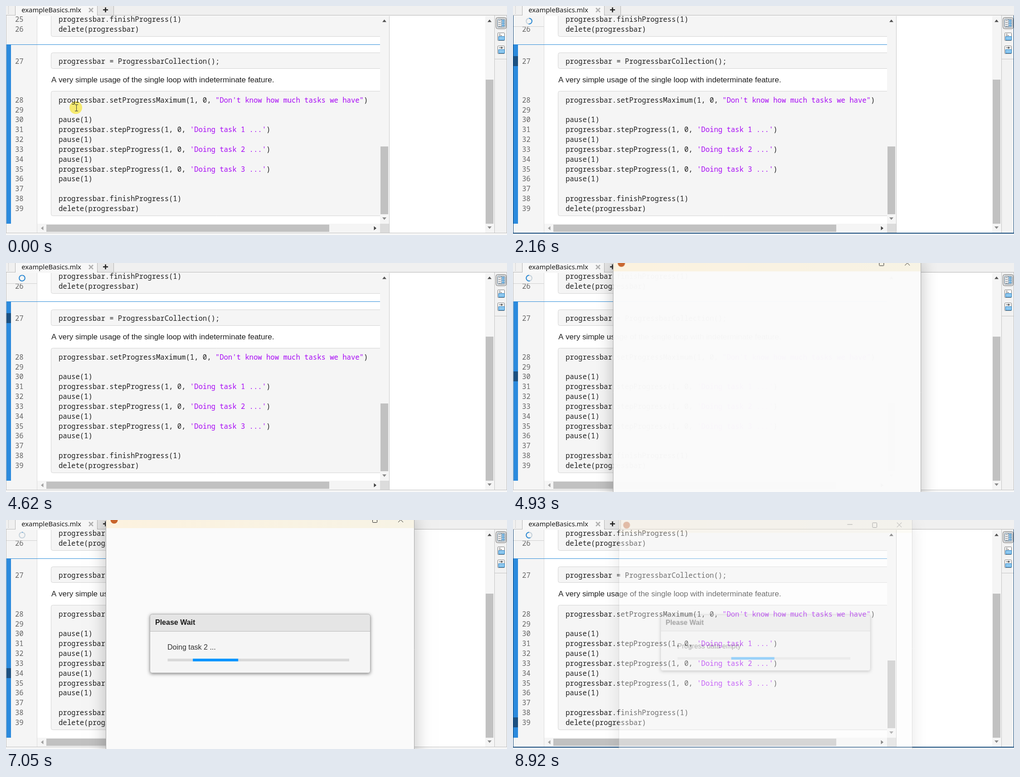
Write an HTML page with a canvas that moves like this. It is 1105 px wide and 507 px high and loops after 8980 ms.

```html
<!DOCTYPE html>
<html lang="en">
<head>
<meta charset="utf-8">
<title>Progress bar demo</title>
<style>
html, body { margin: 0; width: 100%; height: 100%; overflow: hidden; background: #f5f5f5; }
canvas { display: block; }
</style>
</head>
<body>
<canvas id="stage" width="1105" height="507"></canvas>
<script>
const LOOP = 8980, PITCH = 21.82, PAD = 60;
const MONO = '15.58px "Noto Sans Mono", monospace';
const SANS = '"Liberation Sans", Arial, sans-serif';
const stage = document.getElementById('stage').getContext('2d');
const dialogLayer = Object.assign(document.createElement('canvas'), { width: 1105, height: 700 });
const dialogCtx = dialogLayer.getContext('2d');
let c = stage;

const CODE = {
  25: 'progressbar.finishProgress(1)',
  26: 'delete(progressbar)',
  27: 'progressbar = ProgressbarCollection();',
  28: 'progressbar.setProgressMaximum(1, 0, "Don\'t know how much tasks we have")',
  30: 'pause(1)',
  31: "progressbar.stepProgress(1, 0, 'Doing task 1 ...')",
  32: 'pause(1)',
  33: "progressbar.stepProgress(1, 0, 'Doing task 2 ...')",
  34: 'pause(1)',
  35: "progressbar.stepProgress(1, 0, 'Doing task 3 ...')",
  36: 'pause(1)',
  38: 'progressbar.finishProgress(1)',
  39: 'delete(progressbar)'
};

// [start time, value]
const MARKS = [[0, 0], [1140, 27], [4900, 30], [5830, 32], [6860, 34], [7890, 36], [8780, 39]];
const MESSAGES = [[0, "Don't know how much tasks we have"], [5650, 'Doing task 1 ...'],
  [6680, 'Doing task 2 ...'], [7700, 'Doing task 3 ...'], [8720, 'Progress data empty']];

const at = (steps, t) => steps.filter(s => s[0] <= t).pop()[1];
const clamp = v => Math.max(0, Math.min(1, v));
const baseline = n => Math.round(n < 27 ? 35 + (n - 25) * PITCH : n === 27 ? 128 : 213.8 + (n - 28) * PITCH);

function rect(x, y, w, h, color) {
  c.fillStyle = color;
  c.fillRect(x, y, w, h);
}

function box(x, y, w, h, r, fill, stroke) {
  c.beginPath();
  c.roundRect(x, y, w, h, r);
  if (fill) { c.fillStyle = fill; c.fill(); }
  if (stroke) { c.strokeStyle = stroke; c.lineWidth = 1; c.stroke(); }
}

function line(color, width, ...p) {
  c.strokeStyle = color;
  c.lineWidth = width;
  c.beginPath();
  for (let i = 0; i < p.length; i += 4) {
    c.moveTo(p[i], p[i + 1]);
    c.lineTo(p[i + 2], p[i + 3]);
  }
  c.stroke();
}

function arc(x, y, r, from, to, color, width) {
  c.strokeStyle = color;
  c.lineWidth = width;
  c.beginPath();
  c.arc(x, y, r, from, to);
  c.stroke();
}

function disc(x, y, r, color) {
  c.fillStyle = color;
  c.beginPath();
  c.arc(x, y, r, 0, 7);
  c.fill();
}

function text(s, x, y, font, color) {
  c.font = font;
  c.fillStyle = color;
  c.fillText(s, x, y);
}

// Arrow head pointing along (dx, dy)
function arrow(x, y, dx, dy, color) {
  c.fillStyle = color;
  c.beginPath();
  c.moveTo(x + dx * 3, y + dy * 3);
  c.lineTo(x - dx * 2.5 + dy * 4.5, y - dy * 2.5 + dx * 4.5);
  c.lineTo(x - dx * 2.5 - dy * 4.5, y - dy * 2.5 - dx * 4.5);
  c.fill();
}

function codeLine(n) {
  const s = CODE[n], y = baseline(n);
  const cut = s.search(/["']/);
  const parts = cut < 0 ? [s] : [s.slice(0, cut), s.slice(cut, -1), ')'];
  let x = 116;
  parts.forEach((p, i) => {
    text(p, x, y, MONO, i === 1 ? '#a709f5' : '#1f1f1f');
    x += c.measureText(p).width;
  });
}

function tabs() {
  rect(0, 0, 1105, 21, '#f0f0f0');
  for (let y = 1; y < 18; y += 3) rect(5, y, 1, 1, '#999');
  rect(20, 0, 181, 22, '#f7f7f7');
  box(201.5, -4, 36, 24.5, 2, '#e7e7e7', '#b4b4b4');
  line('#b4b4b4', 1, 0, 20.5, 20, 20.5, 20.5, 0, 20.5, 21, 201.5, 0, 201.5, 21, 201, 20.5, 1105, 20.5);
  text('exampleBasics.mlx', 34.2, 14, '14.8px "Noto Sans", sans-serif', '#1a1a1a');
  line('#b0b0b0', 2.5, 183, 4.5, 192, 13.5, 192, 4.5, 183, 13.5);
  line('#222', 2.5, 214, 8.5, 225, 8.5, 219.5, 3, 219.5, 14);
}

function sideIcons() {
  rect(1077, 21, 28, 482, '#f2f2f2');
  line('#c4c4c4', 1, 1077.5, 21, 1077.5, 502, 1078, 117.5, 1105, 117.5);
  box(1080.5, 25.5, 23, 25, 4, '#dcdcdc', '#777');
  box(1084.5, 29.5, 16, 17, 1, '#fff', '#4a6a84');
  line('#4a6a84', 1, 1092.5, 30, 1092.5, 46);
  for (let y = 32.5; y < 46; y += 4) line('#555', 1, 1086, y, 1091, y);
  for (const y of [31.5, 36.5, 41.5]) box(1094.5, y, 4, 3, 0, '#8cc8f0', '#2a7cba');
  for (const y of [68, 97]) {
    box(1084.5, y - 8.5, 15, 17, 1, '#fff', '#777');
    box(1086.5, y - .5, 13, 8, 0, '#8cc8f0', '#2a7cba');
  }
  line('#555', 1, 1087, 62.5, 1091, 62.5, 1087, 65.5, 1094, 65.5, 1087, 92.5, 1097, 92.5);
  disc(1093, 92.5, 2, '#555');
}

function scrollbars() {
  rect(825, 22, 20, 460, '#f5f5f5');
  rect(69, 482, 756, 20, '#f5f5f5');
  rect(825, 482, 20, 20, '#dcdcdc');
  rect(826, 311, 17, 150, '#c1c1c1');
  rect(89, 484, 624, 16, '#c1c1c1');
  arrow(834.5, 33, 0, -1, '#505050');
  arrow(834.5, 470.5, 0, 1, '#8a8a8a');
  arrow(80, 492, -1, 0, '#a0a0a0');
  arrow(814, 492, 1, 0, '#404040');
  rect(845, 22, 1, 480, '#c8c8c8');
  rect(1057, 22, 20, 480, '#f5f5f5');
  rect(1058, 163, 17, 319, '#c1c1c1');
  arrow(1066.5, 33, 0, -1, '#505050');
  arrow(1066.5, 490.5, 0, 1, '#8a8a8a');
}

function spinner(t) {
  rect(1, 22, 67, 23, '#f5f5f5');
  rect(1, 45, 67, 1, '#cfcfcf');
  arc(35.5, 33.5, 6.3, 0, 7, '#c3d0d9', 2);
  const phase = ((t - 7050) / 1000 % 1 + 1) % 1;
  const len = Math.sin(Math.PI * phase) ** .6 * 2 * Math.PI;
  const start = -Math.PI / 2 + (phase > .5 ? 2 * Math.PI - len : 0);
  arc(35.5, 33.5, 6.3, start, start + len, '#2b8ad6', 2);
}

function editor(t) {
  rect(0, 21, 1105, 482, '#fff');
  rect(0, 22, 68, 480, '#f5f5f5');
  rect(68, 22, 1, 480, '#dcdcdc');
  c.save();
  c.beginPath();
  c.rect(0, 22, 825, 460);
  c.clip();
  for (const [y, h] of [[0, 67.5], [103.5, 35], [188.5, 276]]) box(99.5, y, 760, h, 4, '#f5f5f5', '#d4d4d4');
  for (let n = 25; n < 40; n++) {
    text(n, 20, baseline(n), MONO, '#666');
    if (CODE[n]) codeLine(n);
  }
  text('A very simple usage of the single loop with indeterminate feature.', 100, 169, '17px ' + SANS, '#1f1f1f');
  rect(0, 85, 825, 1, '#2b8bd8');
  rect(1, 85, 10, 397, '#2b8add');
  c.restore();

  const mark = at(MARKS, t);
  if (mark) {
    rect(1, baseline(mark) - 17, 10, 22, '#1c5081');
    spinner(t);
  }
  if (t >= 160 && t < 4480 && Math.floor((t - 200) / 530) % 2 === 0) rect(117, 219, 1, 20, '#000');
}

function frameBorder(t) {
  const focused = t >= 80 && t < 4480 || t >= 8800;
  const color = focused ? '#144a7c' : '#c0c0c0';
  rect(0, 503, 1105, 4, '#f7f7f7');
  rect(0, 21, 1, 482, color);
  rect(1104, 21, 1, 482, color);
  rect(0, 502, 1105, focused ? 2 : 1, color);
}

function pointer(t) {
  if (t >= 530) return;
  const a = clamp((t - 40) / 120) * (t >= 80), b = clamp((t - 300) / 230);
  const x = 155 + 11 * a + 64 * b, y = 225 - 6 * a - 250 * b;
  c.globalCompositeOperation = 'multiply';
  disc(x - 1, y, 14, '#fff473');
  c.globalCompositeOperation = 'source-over';
  line('#333', 1, x + .5, y - 6, x + .5, y + 7, x - 3, y - 6.5, x + 4, y - 6.5, x - 3, y + 7.5, x + 4, y + 7.5);
}

function waitBox(t) {
  c.shadowColor = 'rgba(0,0,0,.45)';
  c.shadowBlur = 7;
  c.shadowOffsetY = 2;
  box(317, 208, 487, 131, 5, '#f5f5f5');
  c.shadowColor = 'transparent';
  box(317, 208, 487, 39, [5, 5, 0, 0], '#e5e5e5');
  rect(317, 246, 487, 1, '#b8b8b8');
  box(317.5, 208.5, 486, 130, 5, null, '#b0b0b0');
  text('Please Wait', 329, 232, 'bold 16px ' + SANS, '#1a1a1a');
  text(at(MESSAGES, t), 356, 287, '16px ' + SANS, '#333');
  rect(356.5, 307, 400.5, 6, '#d9d9d9');
  const u = (Math.min(t, 8731) - 5061) / 1495 % 1;
  const x = 257 + 500 * (u - .15 * Math.sin(2 * Math.PI * u) / (2 * Math.PI));
  const left = Math.max(356.5, x), right = Math.min(757, x + 100);
  if (right > left) rect(left, 307, right - left, 6, '#0095ff');
}

function drawDialog(t) {
  c = dialogCtx;
  c.setTransform(1, 0, 0, 1, 0, 0);
  c.clearRect(0, 0, 1105, 700);
  c.translate(0, PAD);
  c.shadowColor = 'rgba(0,0,0,.25)';
  c.shadowBlur = 36;
  c.shadowOffsetY = 8;
  rect(220, -14, 681, 600, '#fafafa');
  c.shadowColor = 'transparent';
  const bar = c.createLinearGradient(220, 0, 900, 0);
  bar.addColorStop(0, '#fcf2df');
  bar.addColorStop(1, '#f7f3e5');
  rect(220, -14, 681, 32, bar);
  box(220.5, -13.5, 680, 600, 0, null, '#a8a8a8');
  disc(238.5, 0, 8, '#c8642c');
  line('#222', 1, 750, -1.5, 762, -1.5, 865, -6, 876, 5, 876, -6, 865, 5);
  box(808.5, -5.5, 10, 11, 1, null, '#222');
  if (t >= 5061) waitBox(t);
  c = stage;

  const opening = clamp((t - 4760) / 200), closing = clamp((t - 8800) / 240);
  const shown = 1 - (1 - opening) ** 2;
  const scale = .9 + .1 * shown - .096 * closing;
  c.save();
  c.globalAlpha = shown * (1 - 1.24 * Math.min(closing, .8));
  c.translate(487, 234);
  c.scale(scale, scale);
  c.drawImage(dialogLayer, -487, -234 - PAD);
  c.restore();
}

function draw(now) {
  const t = now % LOOP;
  editor(t);
  scrollbars();
  sideIcons();
  tabs();
  frameBorder(t);
  pointer(t);
  if (t >= 4800) drawDialog(t);
  requestAnimationFrame(draw);
}
requestAnimationFrame(draw);
</script>
</body>
</html>
```
